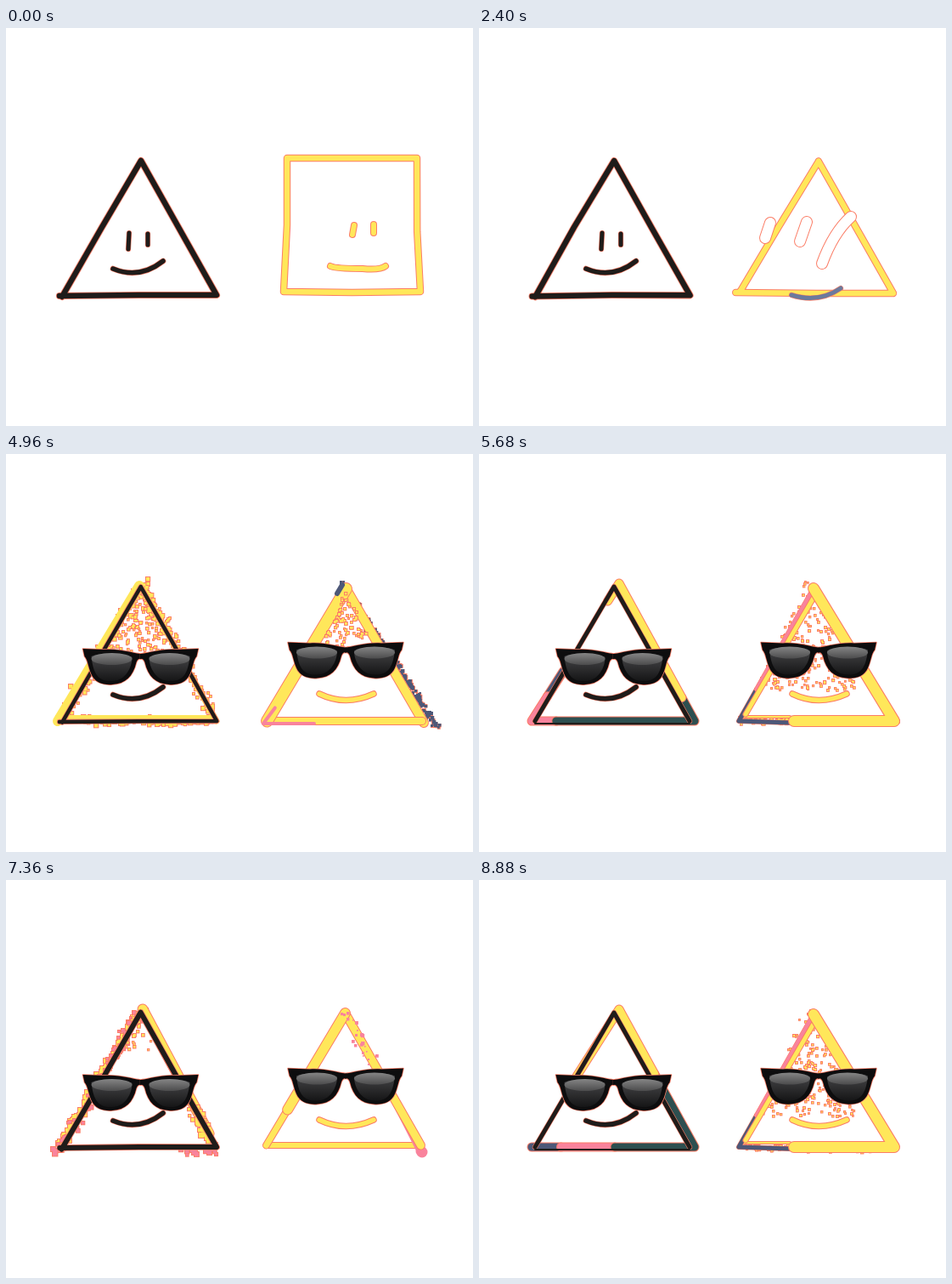
An HTML page with a canvas for the animation above (8.96 s loop, 550 px wide and 468 px high).

```html
<!DOCTYPE html>
<html lang="en">
<head>
<meta charset="utf-8">
<title>Triangle and square</title>
<style>
  html, body { margin: 0; width: 100%; height: 100%; overflow: hidden; background: #fff; }
  canvas { display: block; width: 550px; height: 468px; }
</style>
</head>
<body>
<canvas id="stage" width="550" height="468"></canvas>
<script>
const ctx = document.getElementById('stage').getContext('2d');
const LOOP = 8960, STEP = 80;
const INK = '#1f1c1a', YELLOW = '#ffe75a', EDGE = '#fb7d66', PINK = '#f9839c',
      SLATE = '#4d5878', TEAL = '#2d4f50', BLUE = '#6c7a9c';
ctx.lineCap = ctx.lineJoin = 'round';

let seed = 1;
function rnd() {
  seed = (seed * 16807) % 2147483647;
  return seed / 2147483647;
}
function reseed(n) {
  seed = 7919 * (n + 3) + 11;
  rnd(); rnd();
}
const spread = s => (rnd() + rnd() + rnd() - 1.5) * s;
const lerp = (a, b, u) => a + (b - a) * u;
const mix = (p, q, u) => [lerp(p[0], q[0], u), lerp(p[1], q[1], u)];
const ramp = (t, from, to) => Math.min(1, Math.max(0, (t - from) / (to - from)));

function stroke(path, w, color, edge = 1) {
  if (edge) {
    ctx.lineWidth = w + edge * 2;
    ctx.strokeStyle = EDGE;
    ctx.stroke(path);
  }
  ctx.lineWidth = w;
  ctx.strokeStyle = color;
  ctx.stroke(path);
}
const curve = (d, w, color, edge = 1) => stroke(new Path2D(d), w, color, edge);

function poly(pts, w, color, edge = 1, wob = 0) {
  const path = new Path2D();
  for (const [x, y] of pts) path.lineTo(x + spread(wob), y + spread(wob));
  stroke(path, w, color, edge);
}
function fill(pts, color) {
  const path = new Path2D();
  for (const [x, y] of pts) path.lineTo(x, y);
  path.closePath();
  ctx.fillStyle = color;
  ctx.fill(path);
  ctx.lineWidth = 1;
  ctx.strokeStyle = EDGE;
  ctx.stroke(path);
  return path;
}

// Corners of a triangle: left, right, top
const corners = (x, top, half, base) => [[x - half - 2, base], [x + half - 2, base], [x, top]];
const DARK = corners(159, 156, 91, 314), LIGHT = corners(399.5, 156.5, 91, 312);
const shift = (pts, dx, dy = 0) => pts.map(([x, y]) => [x + dx, y + dy]);

// Overlapping dots share one outline, so a dense spray reads as a ragged brush
function dots(n, place, size, color, edge = 1) {
  const all = Array.from({ length: n }, () => [...place(), size * (0.5 + rnd())]);
  const pass = (grow, paint) => {
    ctx.fillStyle = paint;
    for (const [x, y, s] of all) {
      const d = s + grow;
      ctx.fillRect(Math.round(x - d / 2), Math.round(y - d / 2), d, d);
    }
  };
  if (edge) pass(edge * 2, EDGE);
  pass(0, color);
}
function spray([p, q], n, wide, size, color, edge) {
  dots(n, () => mix(p, q, rnd()).map(v => v + spread(wide)), size, color, edge);
}
// Loose dots that fan out below the top corner
function fan([x, y], height, n, size, color) {
  dots(n, () => {
    const u = Math.sqrt(rnd());
    return [x + (rnd() - 0.5) * u * height * 0.9, y + u * height];
  }, size, color);
}

// Part of a closed outline, from a to b in turns
function part(p, a, b, w, color) {
  const at = u => {
    const v = (u - Math.floor(u)) * 3, i = Math.floor(v);
    return mix(p[i], p[(i + 1) % 3], v - i);
  };
  const pts = [at(a)];
  for (let k = Math.floor(a * 3) + 1; k < b * 3; k++) pts.push(at(k / 3 + 1e-6));
  poly([...pts, at(b)], w, color);
}

function darkTriangle(w, wob) {
  const [l, r, top] = DARK;
  poly([[l[0], l[1] + 2], mix(l, top, .5), top, mix(top, r, .5), r, mix(r, l, .5), [l[0] - 3, l[1] + 1]],
       w, INK, 0.8, wob);
}
function darkFace(eyes) {
  if (eyes) {
    curve('M145 241L144 260', 5, INK, 0.6);
    curve('M167 242L167 255', 5, INK, 0.6);
  }
  curve('M126 283Q157 296 185 274', 5.5, INK, 0.6);
}

function coin(x, y, r) {
  ctx.beginPath();
  ctx.arc(x, y, r, 0, 7);
  ctx.fillStyle = YELLOW;
  ctx.fill();
  ctx.lineWidth = 1.3;
  ctx.strokeStyle = EDGE;
  ctx.stroke();
  const s = r / 9;
  curve(`M${x - 4 * s} ${y - 2 * s}h${8 * s}m0 ${4 * s}h${-8 * s}M${x + 2 * s} ${y - 5 * s}l${-4 * s} ${10 * s}`,
        1.7 * s, INK, 0);
}
// The lower half of the bolt is the upper half turned round
function bolt(x, y, size, color) {
  const half = [[-12, -24], [2, -12], [3, -7], [8, -11]];
  return fill([1, -1].flatMap(k => half.map(([a, b]) => [x + a * k * size, y + b * k * Math.abs(size)])), color);
}
function shard(x, y, dir) {
  fill([[x, y], [x + 16, y - 16 * dir], [x + 7, y - 9 * dir]].map(([a, b]) => [a, b]), YELLOW);
}

function burst(t) {
  if (t < 640 || t > 1600) return;
  if (t === 640) {
    for (let a = 0.4; a < 6; a += Math.PI / 3)
      bolt(270 + 235 * Math.cos(a), 250 + 190 * Math.sin(a), 1, YELLOW);
    return;
  }
  const d = t - 880, g = Math.max(0, d), fall = 0.0011 * g * g;
  coin(228 + 0.06 * d, 113 + 0.05 * d + fall, 9.5);
  coin(228 + 0.1 * d, 214 + 0.17 * d + fall, 9.5);
  coin(483 + 53 * Math.min(1, d / 240), 118 + fall, 9.5);
  if (t <= 1120) {
    bolt(264 + 0.05 * d, 88 - 0.14 * g, 1, YELLOW);
    stroke(bolt(350 + 0.08 * d, 118 - 0.06 * g, -1.3, '#fff'), 2.5, YELLOW, 0.8);
    shard(194 + 0.06 * d, 153 - 0.06 * d, -1);
    shard(194 + 0.06 * d, 287 + 0.06 * d, 1);
  }
  if (t <= 960) {
    coin(146 + 0.1 * d, 220, 6);
    curve('M218 241Q243 233 259 235Q268 238 257 242Q247 243 238 240', 6, INK, 0.6);
    curve('M223 255L234 250L239 255Q248 247 250 257', 5, INK, 0.6);
  }
}

// Square, then trapezoid, then a triangle that overshoots and settles
function lightForm(t, wob) {
  const u = ramp(t, 480, 880), v = ramp(t, 880, 1920);
  const swing = Math.sin(Math.PI * ramp(t, 1200, 2320));
  const half = lerp(lerp(76.5, 21, u), 0, v), mid = lerp(lerp(407.5, 405, u), 399.5, v);
  const top = lerp(153, 156.5, u) - 7 * swing, bow = 2 * (1 - u);
  const a = [mid - half, top], b = [mid + half, top];
  const c = [488 + 11 * swing, lerp(310, 312, u)], d = [lerp(327, 307, u), lerp(310, 311, u)];
  const [ax, bx] = [mix(a, d, .5), mix(b, c, .55)];
  poly([d, [ax[0] + bow, ax[1]], a, b, [bx[0] - bow, bx[1]], c,
        shift([mix(c, d, .5)], 0, 1)[0], [d[0] - 5 * u, d[1]]], 6.5, YELLOW, 1, wob);
}

const smile = () => curve('M369 282Q400 297 433 282', 5.5, YELLOW);

function lightFace(t) {
  if (t < 640) {
    curve('M410 232L408 243', 6, YELLOW);
    curve('M433 231L433 241', 6, YELLOW);
    curve('M382 280Q388 283 420 283Q440 285 447 280', 6, YELLOW);
  } else if (t < 3040) {
    // The features swell and slide off
    const v = ramp(t, 880, 2400), late = v > 0.5;
    const drop = 21 * v + 30 * Math.sin(Math.PI * v), w = 10 + 2 * v;
    if (late) curve('M343 229L337 247', w, '#fff');
    curve(`M386 ${237 - 9 * v}L378 ${265 - 14 * v}`, w, '#fff');
    curve(`M${419 + 19 * v} ${240 - 18 * v}Q${408 + 9 * v} ${251 - 10 * v} 404 ${272 + 5 * v}`, w, '#fff');
    curve(`M368 ${293 + drop}q32 10 58 -8`, late ? 5 : 6, late ? BLUE : '#fff', late ? 0.6 : 1);
  } else {
    curve('M388 236L386 252', 6, YELLOW);
    curve('M413 236L411 252', 6, YELLOW);
    smile();
  }
}

const HALF = new Path2D('M0 6C-12 5 -22 0 -42 1L-68 0L-66 9C-62 13 -62 21 -58 30C-54 40 -43 43 -33 42' +
                        'C-18 41 -9 33 -5 16Q-3 11 0 12Z');
const LENS = new Path2D('M-58 9C-48 4 -20 5 -10 10C-10 22 -18 38 -34 38C-52 39 -56 26 -58 9Z');
function shade(y1, c1, y2, c2) {
  const g = ctx.createLinearGradient(0, y1, 0, y2);
  g.addColorStop(0, c1);
  g.addColorStop(1, c2);
  return g;
}
function glasses(x, y) {
  for (const side of [1, -1]) {
    ctx.save();
    ctx.translate(x, y);
    ctx.scale(side, 1);
    ctx.lineWidth = 1.6;
    ctx.strokeStyle = EDGE;
    ctx.stroke(HALF);
    ctx.fillStyle = '#0d0d0e';
    ctx.fill(HALF);
    ctx.fillRect(-1, 6, 2, 6);
    ctx.fillStyle = shade(5, '#4a4a4c', 40, '#121213');
    ctx.fill(LENS);
    ctx.fillStyle = shade(5, '#858585', 19, '#4c4c4d');
    ctx.beginPath();
    ctx.ellipse(-34, 12, 24, 7, 0, 0, 7);
    ctx.fill();
    ctx.restore();
  }
}

// Pink and yellow chalk
function chalk() {
  let [l, r, top] = shift(DARK, -3);
  spray([top, l], 150, 5, 4, YELLOW);
  spray([top, l], 70, 8, 3, PINK);
  spray([l, [l[0] - 2, 320]], 10, 6, 4, PINK);
  poly([[161, 152], mix(DARK[2], DARK[1], .9)], 11, YELLOW);
  spray([[222, 270], [238, 304]], 40, 8, 4, YELLOW);
  spray([[205, 319], [250, 320]], 14, 4, 4, PINK);
  fan(top, 45, 14, 2, YELLOW);
  darkTriangle(6, .5);

  [l, r, top] = LIGHT;
  poly([l, r], 6, YELLOW);
  poly([mix(top, r, .68), [489, 319]], 10, PINK, 0);
  poly([[489, 319], [490, 320]], 13, PINK, 0);
  poly([top, r], 9, YELLOW);
  poly([l, mix(l, top, .3)], 7, YELLOW);
  poly([mix(l, top, .27), top], 11, YELLOW);
  spray([top, mix(top, r, .4)], 22, 9, 3, PINK, 0);
}

// Thick yellow spatter, charcoal down the right side
function spatter(wide) {
  let [l, r, top] = DARK;
  spray([top, l], 130, wide, 3, YELLOW);
  spray([top, r], 150, wide, 3, YELLOW);
  spray([l, r], 130, wide * .6, 3, YELLOW);
  fan(top, 80, 110, 2, YELLOW);
  poly([[l[0], l[1] - 3], [r[0] - 4, r[1] - 3]], 8, YELLOW, 0);
  poly([r, [158, 154]], 7, YELLOW, 0);
  poly([[157, 155], [61, 314]], 12, YELLOW, 0);
  darkTriangle(4.5, .4);

  [l, r, top] = shift(LIGHT, 1, 2);
  spray([[394, 151], [507, 321]], 260, wide * .6, 3, SLATE, .5);
  poly([top, [492, 316]], 10, YELLOW);
  poly([l, [430, 314], [490, 314]], 8, YELLOW);
  poly([top, l], 13, YELLOW);
  poly([[390, 164], [396, 154]], 6, SLATE, 0);
  poly([mix(l, top, .1), [303, 317], [363, 317]], 4, PINK, 0);
  fan(top, 75, 90, 2, YELLOW);
}

// Colour bands that run round the outline
function bands(turn) {
  const [l, r, top] = DARK;
  const tri = [[62, 314], [254, 314], [165, 152]];
  const ends = [0, .06, .17, .51, .83];
  [SLATE, PINK, TEAL, YELLOW].forEach((c, i) => part(tri, ends[i] + turn, ends[i + 1] + turn, 9, c));
  poly([l, top, r], 5, INK, 0.6);
  poly([[l[0], 317], [r[0], 317]], 2, INK, 0);

  const [p, q] = [[306, 314], [394, 158]], bend = mix(p, q, .24);
  fan([387, 143], 135, 230, 1.5, YELLOW);
  spray([p, [490, 316]], 130, 4, 2, YELLOW);
  poly([[312, 309], [366, 309]], 2, YELLOW);
  poly([bend, p, [366, 316]], 5, SLATE, .5);
  poly([q, bend], 5, PINK, .5);
  poly([[397, 164], [314, 306]], 5, YELLOW);
  poly([q, [489, 314], [371, 314]], 12, YELLOW);
}

function opening(t) {
  const pose = Math.floor(t / 120);
  let p = Math.ceil(pose * 120 / STEP) * STEP;
  if (t >= 2640) p = t < 2880 ? 2640 : t < 3040 ? 2880 : Math.min(t, 3200);
  reseed(p);
  const wob = p ? 0.8 : 0;
  darkTriangle(6.5, wob);
  darkFace(true);
  lightForm(p, wob);
  lightFace(p);
  burst(p);
}

function dressing(t) {
  reseed(t);
  poly([...DARK, DARK[0]], lerp(6, 10, ramp(t, 3360, 4320)), YELLOW, 1, 2);
  darkTriangle(6, 1);
  darkFace(true);
  lightForm(t, 1.2);
  lightFace(t);
}

function brushes(t) {
  const q = (t - 4320) / STEP % 32, bare = t < 4720;
  reseed(q);
  if (q >= 16) bands((q - 25) * 0.015);
  else if (q % 8 >= 4) chalk();
  else spatter(q < 4 ? 13 : 8);
  darkFace(bare);
  if (bare) lightFace(t);
  else smile();
}

function draw(t) {
  ctx.fillStyle = '#fff';
  ctx.fillRect(0, 0, 550, 468);
  if (t < 3360) opening(t);
  else if (t < 4320) dressing(t);
  else brushes(t);
  if (t >= 4160) {
    const drop = 135 * (ramp(t, 4155, 4720) ** 2 - 1);
    glasses(158.5, 229 + drop);
    glasses(400, 221.5 + drop);
  }
}

let shown = -1;
const start = performance.now();
function tick() {
  const t = Math.floor(((performance.now() - start) % LOOP) / STEP) * STEP;
  if (t !== shown) draw(shown = t);
  requestAnimationFrame(tick);
}
tick();
</script>
</body>
</html>
```
